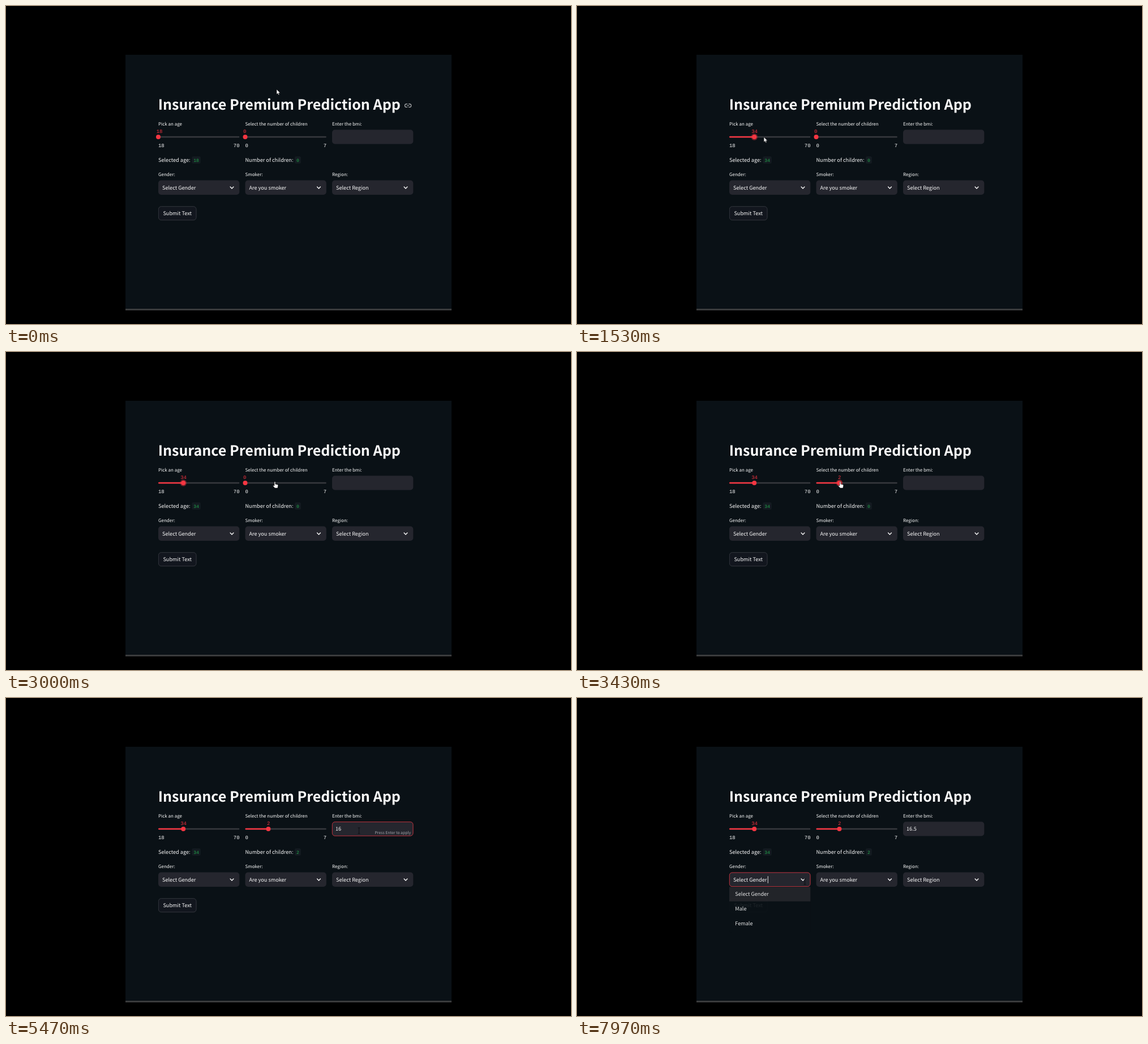
Recreate the animation shown at these times as an HTML page. Size 998 by 561 pixels, loop 8000 ms.

```html
<!DOCTYPE html>
<html lang="en">
<head>
<meta charset="utf-8">
<title>Insurance Premium Prediction App</title>
<style>
html, body { margin: 0; width: 100%; height: 100%; overflow: hidden; background: #000; }
svg { display: block; width: 998px; height: 561px; }
text {
  font: 9.15px "Noto Sans CJK SC", "Noto Sans CJK JP", "Noto Sans", sans-serif;
  fill: #fafafa; white-space: pre; text-rendering: geometricPrecision;
}
.title { font-size: 25.05px; font-weight: 700; }
.label { font-size: 8px; }
.hint { font-size: 6.86px; fill: #a3a4aa; text-anchor: end; }
.mono { font: 8.95px "Liberation Mono", "DejaVu Sans Mono", monospace; }
.end { text-anchor: end; }
.mid { text-anchor: middle; }
.value { fill: #f2323f; text-anchor: middle; }
.code { font-size: 8.1px; fill: #21a54b; text-anchor: middle; }
.chip { fill: #141b21; }
.field { fill: #25262e; }
.track { fill: #37393e; }
.red { fill: #f63642; }
.glow { fill: #f63642; fill-opacity: .38; }
.outline { fill: none; stroke: #cf343f; stroke-width: .9; }
.line { fill: none; stroke: #fafafa; stroke-width: 1.4; stroke-linecap: round; stroke-linejoin: round; }

/* hard switches; 1% is 80 ms */
.s { animation: 8s step-end infinite; }
.link { animation-name: link; }
.age0 { animation-name: age0; }
.age1 { animation-name: age1; }
.ageCode0 { animation-name: ageCode0; }
.ageCode1 { animation-name: ageCode1; }
.ageGlow { animation-name: ageGlow; }
.kids0 { animation-name: kids0; }
.kids1 { animation-name: kids1; }
.kidsCode0 { animation-name: kidsCode0; }
.kidsCode1 { animation-name: kidsCode1; }
.kidsGlow { animation-name: kidsGlow; }
.focus { animation-name: focus; }
.hint { animation-name: hint; }
.bmi1 { animation-name: bmi1; }
.bmi2 { animation-name: bmi2; }
.bmi3 { animation-name: bmi3; }
.caret { animation-name: caret; }
.open { animation-name: open; }
.arrow { animation-name: arrow; }
.hand { animation-name: hand; }
.beam { animation-name: beam; }
@keyframes link { 0% { opacity: 1 } 6.5% { opacity: 0 } }
@keyframes age0 { 0% { opacity: 1 } 12.5% { opacity: 0 } }
@keyframes age1 { 0% { opacity: 0 } 12.5% { opacity: 1 } }
@keyframes ageCode0 { 0% { opacity: 1 } 15.6% { opacity: 0 } }
@keyframes ageCode1 { 0% { opacity: 0 } 15.6% { opacity: 1 } }
@keyframes ageGlow { 0% { opacity: 0 } 12.5% { opacity: 1 } 40% { opacity: 0 } }
@keyframes kids0 { 0% { opacity: 1 } 40% { opacity: 0 } }
@keyframes kids1 { 0% { opacity: 0 } 40% { opacity: 1 } }
@keyframes kidsCode0 { 0% { opacity: 1 } 43.1% { opacity: 0 } }
@keyframes kidsCode1 { 0% { opacity: 0 } 43.1% { opacity: 1 } }
@keyframes kidsGlow { 0% { opacity: 0 } 40% { opacity: 1 } 50% { opacity: 0 } }
@keyframes focus { 0% { opacity: 0 } 50% { opacity: 1 } 94.1% { opacity: 0 } }
@keyframes hint { 0% { opacity: 0 } 53.3% { opacity: 1 } 94.1% { opacity: 0 } }
@keyframes bmi1 { 0% { opacity: 0 } 53.3% { opacity: 1 } 62.1% { opacity: 0 } }
@keyframes bmi2 { 0% { opacity: 0 } 62.1% { opacity: 1 } 75% { opacity: 0 } }
@keyframes bmi3 { 0% { opacity: 0 } 75% { opacity: 1 } }
@keyframes caret {
  0% { opacity: 0; transform: none }
  50% { opacity: 1; transform: none }
  53.3% { opacity: 1; transform: translateX(5px) }
  59.9% { opacity: 0; transform: translateX(5px) }
  62.1% { opacity: 1; transform: translateX(10px) }
  68.3% { opacity: 0; transform: translateX(10px) }
  75% { opacity: 1; transform: translateX(17.7px) }
  81.6% { opacity: 0; transform: translateX(17.7px) }
  88.3% { opacity: 1; transform: translateX(17.7px) }
  94.1% { opacity: 0; transform: translateX(17.7px) }
}
@keyframes open { 0% { opacity: 0 } 94.1% { opacity: 1 } }
@keyframes arrow { 0% { opacity: 1 } 30.6% { opacity: 0 } }
@keyframes hand { 0% { opacity: 0 } 30.6% { opacity: 1 } 46.8% { opacity: 0 } }
@keyframes beam { 0% { opacity: 0 } 46.8% { opacity: 1 } 88.3% { opacity: 0 } 88.7% { opacity: 1 } }

.menu { animation: menu 8s ease-out infinite; }
@keyframes menu { 0%, 94.2% { opacity: 0 } 98%, 100% { opacity: .92 } }

.cursor { animation: move 8s ease-in-out infinite; }
@keyframes move {
  0%, 1.2% { transform: translate(478px, 147px) }
  9.8%, 17.5% { transform: translate(312px, 233px) }
  23.6% { transform: translate(433px, 221px) }
  32.5%, 38% { transform: translate(475px, 229px) }
  39.5%, 43% { transform: translate(465px, 229px) }
  48.8%, 88.3% { transform: translate(623.5px, 234px) }
  88.7%, 100% { transform: translate(402.5px, 324px) }
}
</style>
</head>
<body>
<svg viewBox="0 0 998 561">
  <defs>
    <path id="chevron" class="line" d="M-2.9-1.4 0 1.5 2.9-1.4"/>
    <rect id="box" class="field" width="143.3" height="25.3" rx="5"/>
    <rect id="track" class="track" width="143.3" height="2.4" y="-1.2" rx="1.2"/>
  </defs>

  <rect x="211" y="86" width="576" height="451" fill="#0a1116"/>
  <rect x="211" y="534" width="576" height="3" fill="#3a3b3c"/>

  <text class="title" x="268.7" y="183">Insurance Premium Prediction App</text>
  <g class="s link" fill="none" stroke="#b9bbbd" stroke-width="1.1">
    <path d="M709.2 172.9h-1.9a2.8 2.8 0 0 0 0 5.6h1.9M711 172.9h1.9a2.8 2.8 0 0 1 0 5.6H711M707.8 175.7h4.6"/>
  </g>

  <!-- age slider -->
  <text class="label" x="269" y="211">Pick an age</text>
  <use href="#track" x="269" y="231"/>
  <g class="s age0">
    <circle class="red" cx="269" cy="231" r="4"/>
    <text class="mono value" x="271" y="223.6">18</text>
  </g>
  <g class="s age1">
    <rect class="red" x="269" y="229.8" width="44" height="2.4" rx="1.2"/>
    <circle class="s glow ageGlow" cx="313.2" cy="231" r="6"/>
    <circle class="red" cx="313.2" cy="231" r="4"/>
    <text class="mono value" x="313.5" y="223.6">34</text>
  </g>
  <text class="mono" x="269" y="248.7">18</text>
  <text class="mono end" x="412.5" y="248.7">70</text>
  <text x="269" y="274.8">Selected age:</text>
  <rect class="chip" x="328.3" y="265.3" width="15.4" height="12.8" rx="2.5"/>
  <text class="mono code s ageCode0" x="336" y="274.8">18</text>
  <text class="mono code s ageCode1" x="336" y="274.8">34</text>

  <!-- children slider -->
  <text class="label" x="422.5" y="211">Select the number of children</text>
  <use href="#track" x="422.5" y="231"/>
  <g class="s kids0">
    <circle class="red" cx="422.5" cy="231" r="4"/>
    <text class="mono value" x="421.8" y="223.6">0</text>
  </g>
  <g class="s kids1">
    <rect class="red" x="422.5" y="229.8" width="41" height="2.4" rx="1.2"/>
    <circle class="s glow kidsGlow" cx="463.4" cy="231" r="6"/>
    <circle class="red" cx="463.4" cy="231" r="4"/>
    <text class="mono value" x="463.7" y="223.6">2</text>
  </g>
  <text class="mono" x="422.5" y="248.7">0</text>
  <text class="mono end" x="566" y="248.7">7</text>
  <text x="422.5" y="274.8">Number of children:</text>
  <rect class="chip" x="510" y="265.3" width="10.8" height="12.8" rx="2.5"/>
  <text class="mono code s kidsCode0" x="515.4" y="274.8">0</text>
  <text class="mono code s kidsCode1" x="515.4" y="274.8">2</text>

  <!-- bmi input -->
  <text class="label" x="576" y="211">Enter the bmi:</text>
  <use href="#box" x="576" y="218.2"/>
  <rect class="outline s focus" x="576.3" y="218.6" width="142.7" height="24.6" rx="4.8"/>
  <text class="s bmi1" x="582" y="234.4">1</text>
  <text class="s bmi2" x="582" y="234.4">16</text>
  <text class="s bmi3" x="582" y="234.4">16.5</text>
  <rect class="s caret" x="581.9" y="224.5" width=".9" height="12.4" fill="#fafafa"/>
  <text class="s hint" x="715" y="240">Press Enter to apply</text>

  <!-- selects -->
  <text class="label" x="269" y="300.3">Gender:</text>
  <text class="label" x="422.5" y="300.3">Smoker:</text>
  <text class="label" x="576" y="300.3">Region:</text>
  <use href="#box" x="269" y="307.6"/>
  <use href="#box" x="422.5" y="307.6"/>
  <use href="#box" x="576" y="307.6"/>
  <text x="276" y="323.9">Select Gender</text>
  <text x="429.5" y="323.9">Are you smoker</text>
  <text x="583" y="323.9">Select Region</text>
  <use href="#chevron" x="399" y="320.4"/>
  <use href="#chevron" x="552.5" y="320.4"/>
  <use href="#chevron" x="706" y="320.4"/>

  <rect x="269.4" y="353.7" width="66.6" height="24" rx="4.8" fill="#12161e" stroke="#3d4047" stroke-width=".8"/>
  <text class="mid" x="302.7" y="369.4">Submit Text</text>

  <g class="s open">
    <rect class="outline" x="269.3" y="308" width="142.7" height="24.6" rx="4.8"/>
    <rect x="336.8" y="314.3" width=".9" height="12.4" fill="#fafafa"/>
  </g>
  <g class="menu">
    <rect x="269" y="333" width="143.3" height="81" rx="4" fill="#0a1116"/>
    <rect x="269" y="333.4" width="143.3" height="25.4" fill="#25262b"/>
    <text x="279.3" y="349.4">Select Gender</text>
    <text x="279.3" y="374.9">Male</text>
    <text x="279.3" y="400.5">Female</text>
  </g>

  <g class="cursor">
    <path class="s arrow" d="M0 0v8.8l2-1.8 1.4 3 1.5-.7L3.5 6.4h2.9z" fill="#fff" stroke="#000" stroke-width=".5"/>
    <path class="s hand" d="M-1 .2q1-1 1.8 0v3.9l4 .9q1 .3.8 1.5l-.8 4.5h-4.900L-3.400 7.300q.3-1.200 2.400-.3z" fill="#fff" stroke="#111" stroke-width=".5"/>
    <path class="s beam" d="M-1.800-5h3.600M-1.800 5h3.600M0-5V5" fill="none" stroke="#0d0d12" stroke-width="1"/>
  </g>
</svg>
</body>
</html>
```
